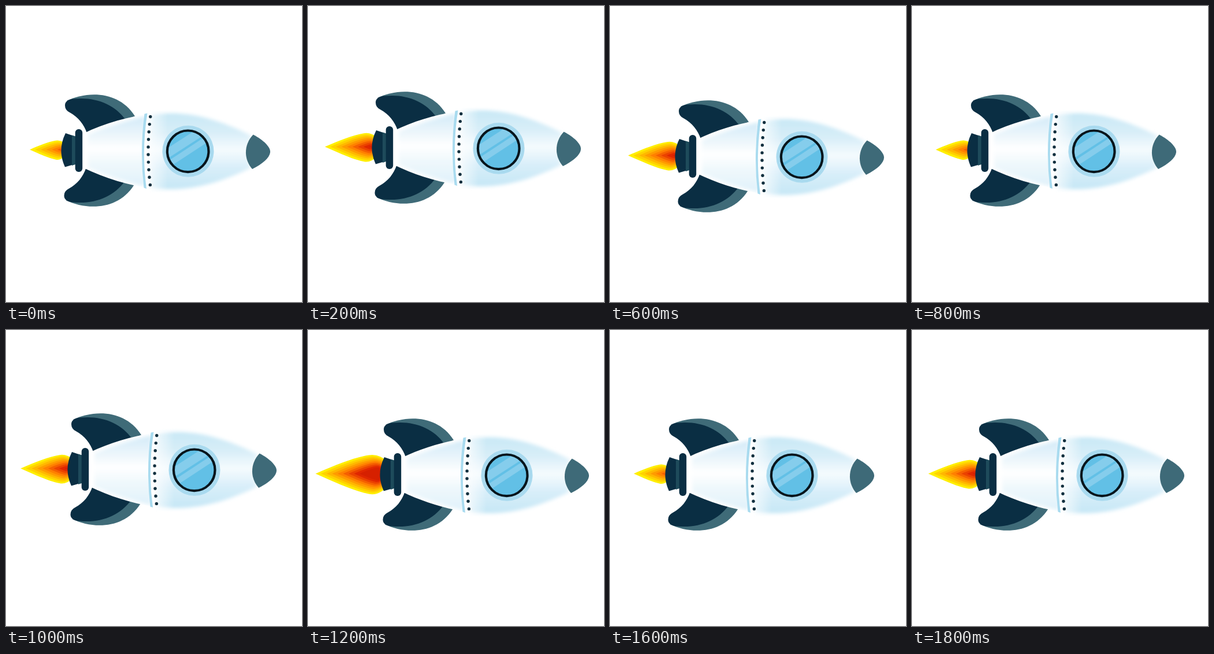
Recreate the animation shown at these times as an HTML page. Size 512 px wide and 512 px high, loop 2000 ms.

```html
<!DOCTYPE html>
<html lang="en">
<head>
<meta charset="utf-8">
<title>Rocket</title>
<style>
  html, body { margin: 0; width: 100%; height: 100%; overflow: hidden; background: #fff; }
  svg { display: block; width: 100vw; height: 100vh; }
</style>
</head>
<body>
<svg viewBox="0 0 512 512">
  <defs>
    <linearGradient id="rear" x1="0" y1="0" x2="0" y2="1">
      <stop offset="0" stop-color="#d3ebf8"/>
      <stop offset=".25" stop-color="#eaf5fb"/>
      <stop offset=".46" stop-color="#fff"/>
      <stop offset=".68" stop-color="#eff8fc"/>
      <stop offset="1" stop-color="#dff1fa"/>
    </linearGradient>
    <linearGradient id="front" x1="0" y1="0" x2="0" y2="1">
      <stop offset="0" stop-color="#c8e8f6"/>
      <stop offset=".25" stop-color="#d8eef8"/>
      <stop offset=".48" stop-color="#f5fbfe"/>
      <stop offset=".72" stop-color="#d8eef9"/>
      <stop offset="1" stop-color="#c6e7f6"/>
    </linearGradient>
    <linearGradient id="sheen">
      <stop offset="0" stop-color="#fff" stop-opacity=".9"/>
      <stop offset="1" stop-color="#fff" stop-opacity="0"/>
    </linearGradient>
    <filter id="soft"><feGaussianBlur stdDeviation="3"/></filter>
    <path id="hull" d="M134 220.500C180 198.500 236 184 290 184C340 185 390 202 427 222Q411 252 426 282C390 302 340 318 290 318C236 318 180 302 134 280Z"/>
    <clipPath id="hullClip"><use href="#hull"/></clipPath>
    <clipPath id="glass"><circle cx="314.700" cy="251.300" r="35"/></clipPath>
    <g id="fin">
      <path fill="#3f6b78" d="M105 164C140 147 195 146 223 190.500L202 200L140 180Z"/>
      <path fill="#0a2e43" d="M102 172C102 165 108 161 118 160.500C155 157 188 170 207 197L140 220C135 205 125 192 110 184Q102 180 102 172Z"/>
    </g>
  </defs>
  <g id="rocket">
    <g id="flame"></g>
    <use href="#fin"/>
    <use href="#fin" transform="translate(-1.500 500) scale(1 -1)"/>
    <use href="#hull" fill="#fff"/>
    <g clip-path="url(#hullClip)">
      <path fill="url(#rear)" filter="url(#soft)" d="M142 222Q190 202 240 191V312Q190 300 142 280Z"/>
    </g>
    <path fill="url(#front)" filter="url(#soft)" d="M251 188C300 181 352 188 424 224Q414 252 423 280C352 315 300 321 251 315Q243 252 251 188Z"/>
    <path fill="url(#sheen)" d="M244 184H280V319H244Q234 252 244 184Z"/>
    <path fill="#a9dbef" d="M239.500 186.500L244.500 185.500Q234 251 243 316L238.500 314.500Q231 251 239.500 186.500Z"/>
    <g id="rivets" fill="#12303f"></g>
    <circle cx="315" cy="251.300" r="44.500" fill="#a9daef"/>
    <circle cx="314.700" cy="251.300" r="35.800" fill="#62c0e6"/>
    <g clip-path="url(#glass)" stroke="#85cdec">
      <path stroke-width="15" d="M270 261L360 203"/>
      <path stroke-width="10" d="M270 281L360 222"/>
    </g>
    <circle cx="314.700" cy="251.300" r="35.800" fill="none" stroke="#07151c" stroke-width="4.200"/>
    <path fill="#3e6a78" d="M427.500 222.500C446 232 457 244 457 252C457 261 446 272 426 282C411 265 411 240 427.500 222.500Z"/>
    <path fill="#0a2e43" d="M103 220L121 226V273L102 278.500Q88.500 249 103 220Z"/>
    <path fill="#1e4b5b" d="M114 223.500L120 225.500V274L114 276Z"/>
    <rect x="119.700" y="213" width="12.500" height="74" rx="6" fill="#0a2e43"/>
  </g>
</svg>
<script>
const STEP = 200, INSET = 0.085;
// Each pose: x offset, y offset, flame size
const rest = [0, 0, 0.49], thrust = [29, 0, 1];
const poses = [
  rest, [15, -5, 0.73], thrust, [17, 10, 0.73],
  rest, [11, -9, 0.73], thrust, [11, 7.5, 0.73],
  rest, [14, 0, 0.73]
];
const byId = id => document.getElementById(id);

function add(parent, tag, attrs) {
  const node = document.createElementNS("http://www.w3.org/2000/svg", tag);
  for (const key in attrs) node.setAttribute(key, attrs[key]);
  return parent.appendChild(node);
}

for (let i = 0; i < 10; i++) {
  const y = 191.5 + i * 13.1;
  add(byId("rivets"), "circle", { cx: 246 + 3.8 * ((y - 252) / 61) ** 2, cy: y, r: 2.7 });
}

const bands = Array.from({ length: 9 }, (_, k) => add(byId("flame"), "path", {
  d: "M-112 0C-80 -14 -46 -28 -20 -32Q-2 -35 14 -20V20Q-2 39 -20 35C-46 30 -80 14 -112 0Z",
  fill: `hsl(${Math.max(9, 56 - 6.5 * k)} 100% ${50 - 2 * Math.max(0, k - 4)}%)`
}));

function draw(now) {
  const [x, y, size] = poses[Math.floor(now / STEP) % poses.length];
  byId("rocket").setAttribute("transform", `translate(${x} ${y})`);
  bands.forEach((band, k) => {
    const scale = Math.max(0, size - INSET * k);
    band.setAttribute("transform", `translate(96 248.5) scale(${scale})`);
  });
  requestAnimationFrame(() => draw(performance.now()));
}
draw(0);
</script>
</body>
</html>
```
